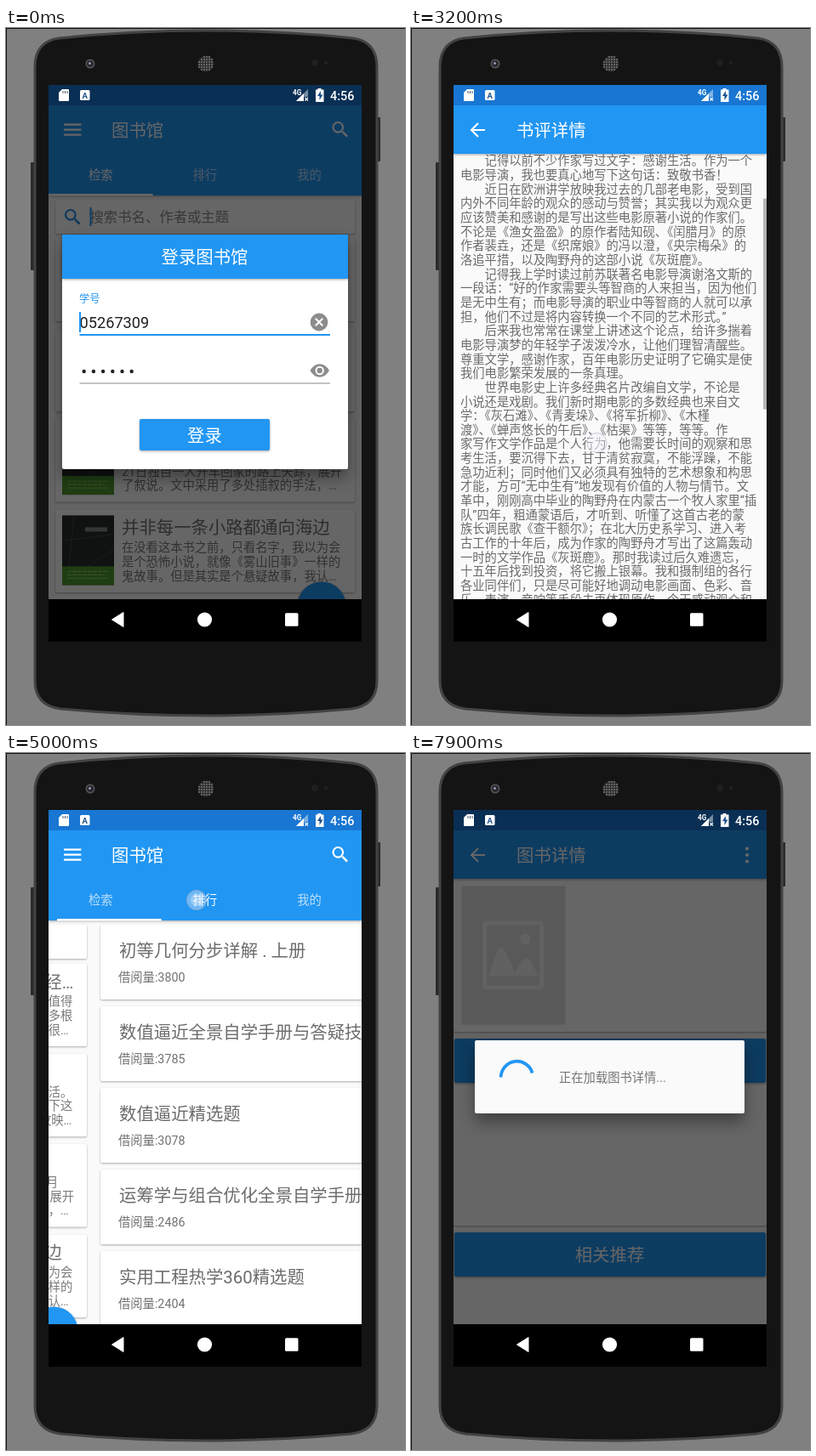
Animation of 469 by 820 pixels, one loop 8000 ms. Source, as an HTML page:

```html
<!DOCTYPE html>
<html lang="zh-CN">
<head>
<meta charset="utf-8">
<title>图书馆</title>
<style>
html, body { margin: 0; width: 100%; height: 100%; overflow: hidden; background: #808080; }
svg { display: block; width: 469px; height: 820px; }
text { font-family: Roboto, "Noto Sans CJK SC", "Noto Sans CJK", sans-serif; white-space: pre; }
.card { fill: #fff; filter: drop-shadow(0 1px 1px rgba(0,0,0,.32)); }
.raised { filter: drop-shadow(0 1px 1.5px rgba(0,0,0,.35)); }
.float { filter: drop-shadow(0 10px 9px rgba(0,0,0,.38)); }
.line { fill: none; stroke-width: 2.1; }
</style>
</head>
<body>
<svg id="stage" viewBox="0 0 469 820"></svg>
<script>
const BLUE = '#2196f3', GREY = '#717171';
const $ = id => document.getElementById(id);

// ---- drawing helpers ----
const rect = (x, y, w, h, fill, more = '') =>
  `<rect x="${x}" y="${y}" width="${w}" height="${h}" fill="${fill}" ${more}/>`;
const circle = (x, y, r, fill, more = '') =>
  `<circle cx="${x}" cy="${y}" r="${r}" fill="${fill}" ${more}/>`;
const path = (d, fill, more = '') => `<path d="${d}" fill="${fill}" ${more}/>`;
const stroke = (d, color, more = '') => `<path class="line" d="${d}" stroke="${color}" ${more}/>`;
// y is the vertical centre of the glyphs
const text = (x, y, str, size, fill, more = '') =>
  `<text x="${x}" y="${(y + size * .37).toFixed(2)}" font-size="${size}" fill="${fill}" ${more}>${str}</text>`;
const mid = (x, y, str, size, fill, more = '') =>
  text(x, y, str, size, fill, 'text-anchor="middle" ' + more);
const card = (x, y, w, h) => rect(x, y, w, h, '#fff', 'class="card" rx="2"');
const group = (id, body, more = '') => `<g id="${id}" ${more}>${body}</g>`;

const menu = stroke('M68 113.6h20.4M68 119.6h20.4M68 125.6h20.4', '#fff');
const back = stroke('M87 120H71M79 112l-8 8 8 8', '#fff');
const lens = (x, y, c) => `<g transform="translate(${x} ${y})">` +
  stroke('M2.9 2.9L8.6 8.6', c, 'style="stroke-width:2.6"') +
  `<circle class="line" cx="-2.2" cy="-2.2" r="5.8" stroke="${c}"/></g>`;
const dots = [112.5, 120, 127.5].map(y => circle(395, y, 2.1, '#fff')).join('');
const star = x => path('M0-7L1.9-2.4 6.8-2 3.1 1.2 4.2 6 0 3.4-4.2 6-3.1 1.2-6.8-2-1.9-2.4Z',
  '#dadada', `transform="translate(${x} 199)"`);

// a whole window: status bar, app bar, body and the black strip below
const page = (id, title, icons, barHeight, body, barMore = '') => group(id,
  rect(50, 67, 368, 605, '#fafafa') +
  `<g clip-path="url(#body)">${body}</g>` +
  rect(50, 91, 368, barHeight, BLUE, 'class="raised"') +
  rect(50, 67, 368, 24, '#1976d2') +
  icons + text(124, 120, title, 20.4, '#fff') + barMore +
  rect(50, 672, 368, 70, '#000'));

// ---- book covers ----
const slateCover = (x, y) => `<g transform="translate(${x} ${y})">` +
  rect(0, 0, 61, 82, '#6b8494') +
  [10, 26, 42, 58, 74].map(r => stroke(`M4 ${r}H58`, '#5c7686', 'stroke-dasharray="2 6"')).join('') +
  rect(18, 6, 22, 55, '#3c3a3a', 'rx="2"') + rect(19, 7, 20, 26, '#b9b0ad') +
  path('M19 33V27l7-7 4 4 5-2 4 5v6z', '#57504f') + rect(19, 34, 20, 26, '#f4f4f2') +
  [...'灰斑鹿'].map((c, i) => mid(34, 39 + i * 7, c, 6.5, '#222')).join('') +
  stroke('M22 37v18M26 42v14', '#999', 'style="stroke-width:1"') + '</g>';
const darkCover = (x, y) => `<g transform="translate(${x} ${y})">` +
  rect(0, 0, 61, 82, '#252d2b') + rect(0, 60, 61, 22, '#4f9a2c') +
  stroke('M0 30L61 22M14 0L8 60M61 40L30 60', '#3f4a46', 'style="stroke-width:1"') +
  rect(27, 14, 26, 5, '#7d8a84') +
  stroke('M6 66H55M6 70H50M6 74H55', '#96cc76', 'style="stroke-width:1" stroke-dasharray="5 1"') + '</g>';
const paleCover = (x, y) => `<g transform="translate(${x} ${y})">` +
  rect(0, 0, 61, 82, '#c9c2b4') + rect(8, 12, 45, 30, '#8c7f6c') + '</g>';

// ---- home: search tab ----
const reviews = [
  [paleCover, '慢灯夜谈：不急才是真正经…', '这本书语言平实却有味道，确实非常值得',
    '静下心来慢慢读完，书里的故事有很多根', '源都在身边的小事里，读着读着就像很…'],
  [slateCover, '致敬书香', '记得以前不少作家写过文字：感谢生活。',
    '作为一个电影导演，我也要真心地写下这', '句话：致敬书香！ 近日在欧洲讲学放映…'],
  [darkCover, '灯塔熄灭的那一夜', '小说以一位寡言的女教师于2009年8月',
    '21日独自一人开车回家的路上失踪，展开', '了叙说。文中采用了多处插叙的手法，…'],
  [darkCover, '并非每一条小路都通向海边', '在没看这本书之前，只看名字，我以为会',
    '是个恐怖小说，就像《雾山旧事》一样的', '鬼故事。但是其实是个悬疑故事，我认…']
];
const searchTab = card(58, 202, 352, 40) + lens(78, 222, '#1e88e5') +
  text(98.5, 222, '搜索书名、作者或主题', 16.36, '#8a8a8a') +
  group('searchCaret', rect(98.5, 211, 2, 22, BLUE)) +
  reviews.map(([cover, title, ...lines], i) => {
    const y = 247.5 + i * 106.3;
    return card(58, y, 352, 97.5) + cover(66, y + 7) + text(136, y + 21.5, title, 20.4, GREY) +
      lines.map((s, n) => text(136, y + 44.5 + n * 16.8, s, 14.3, '#7a7a7a')).join('');
  }).join('') + circle(371, 680, 28.6, BLUE, 'class="raised"');

// ---- home: ranking tab ----
const ranking = [['初等几何分步详解 . 上册', 3800], ['数值逼近全景自学手册与答疑技…', 3785],
  ['数值逼近精选题', 3078], ['运筹学与组合优化全景自学手册', 2486], ['实用工程热学360精选题', 2404]];
const rankTab = ranking.map(([title, n], i) => {
  const y = 202 + i * 96;
  return card(58, y, 352, 88) + text(80, y + 30, title, 20.4, '#6c6c6c') +
    text(79, y + 62, '借阅量:' + n, 14.3, GREY);
}).join('');

const tabs = ['检索', '排行', '我的'].map((s, i) =>
  mid(111.3 + i * 122.67, 173, s, 14.3, '#fff', `id="tab${i}"`)).join('') +
  rect(50, 195, 122.67, 2.6, '#fff', 'id="marker"');
const home = page('home', '图书馆', menu + lens(392.5, 119, '#fff'), 106,
  group('pager', searchTab + `<g transform="translate(368)">${rankTab}</g>`), tabs);

// ---- login dialog ----
const login = group('login',
  rect(66, 243, 336, 276, '#fff', 'class="float" rx="2"') +
  rect(66, 243, 336, 52, BLUE, 'class="raised"') + mid(233.5, 269.5, '登录图书馆', 20.4, '#fff') +
  text(86, 318, '学号', 12.3, BLUE) + text(86.5, 346, '05267309', 18.2, '#212121') +
  group('idCaret', rect(86, 334, 2, 24, BLUE)) + rect(86.5, 360, 294.5, 2, BLUE) +
  circle(368, 346, 10.4, '#8c8c8c') + stroke('M363.8 341.8l8.4 8.4m0-8.4l-8.4 8.4', '#fff') +
  [0, 1, 2, 3, 4, 5].map(i => circle(91.7 + i * 11.2, 404, 2.2, '#212121')).join('') +
  rect(86.5, 417.5, 294.5, 1, '#8a8a8a') +
  path('M357.5 403Q362 395.3 368.7 395.3T380 403Q375.500 410.700 368.700 410.700T357.500 403Z', '#8c8c8c') +
  circle(368.7, 403, 4.2, '#8c8c8c', 'stroke="#fff" stroke-width="2"') +
  rect(157, 460, 153, 37, BLUE, 'class="raised" rx="2"') + mid(233.5, 479, '登录', 20.4, '#fff'));

// ---- review page ----
const article = `　　记得以前不少作家写过文字：感谢生活。作为一个
电影导演，我也要真心地写下这句话：致敬书香！
　　近日在欧洲讲学放映我过去的几部老电影，受到国
内外不同年龄的观众的感动与赞誉；其实我以为观众更
应该赞美和感谢的是写出这些电影原著小说的作家们。
不论是《渔女盈盈》的原作者陆知砚、《闰腊月》的原
作者裴垚，还是《织席娘》的冯以澄，《央宗梅朵》的
洛追平措，以及陶野舟的这部小说《灰斑鹿》。
　　记得我上学时读过前苏联著名电影导演谢洛文斯的
一段话：“好的作家需要头等智商的人来担当，因为他们
是无中生有；而电影导演的职业中等智商的人就可以承
担，他们不过是将内容转换一个不同的艺术形式。”
　　后来我也常常在课堂上讲述这个论点，给许多揣着
电影导演梦的年轻学子泼泼冷水，让他们理智清醒些。
尊重文学，感谢作家，百年电影历史证明了它确实是使
我们电影繁荣发展的一条真理。
　　世界电影史上许多经典名片改编自文学，不论是
小说还是戏剧。我们新时期电影的多数经典也来自文
学：《灰石滩》、《青麦垛》、《将军折柳》、《木槿
渡》、《蝉声悠长的午后》、《枯渠》等等，等等。作
家写作文学作品是个人行为，他需要长时间的观察和思
考生活，要沉得下去，甘于清贫寂寞，不能浮躁，不能
急功近利；同时他们又必须具有独特的艺术想象和构思
才能，方可“无中生有”地发现有价值的人物与情节。文
革中，刚刚高中毕业的陶野舟在内蒙古一个牧人家里“插
队”四年，粗通蒙语后，才听到、听懂了这首古老的蒙
族长调民歌《查干额尔》；在北大历史系学习、进入考
古工作的十年后，成为作家的陶野舟才写出了这篇轰动
一时的文学作品《灰斑鹿》。那时我读过后久难遗忘，
十五年后找到投资，将它搬上银幕。我和摄制组的各行
各业同伴们，只是尽可能好地调动电影画面、色彩、音
乐、表演、音响等手段去再体现原作，今天感动观众和
启发人们思辨的主要还是原小说的人物、情节及思想！
　　当然，原创电影剧本也产生了一些经典电影，祁墨
岑、鲍湛、纪蘅川等第六代电影导演以自己写作的原创
电影取得了一些成功。近年来导演自编自导的现象也似
乎越来越烈。但是，以我教授导演五十年的阅历来看，
多数导演并不具备独立编剧的能力，即使偶尔成功也难
以持久。影视导演是在商业运作、技术控制、制片事物
的复杂过程中进行创作的，大量的时间与精力都会被牵
扯到或浪费到许多无艺术、思想价值的活动中去，再有
才能的人想又编又导也会江郎才尽，无以为继。
　　37年前的一次创作会议上，老前辈郭砚林导演针对
我们这批刚拿出《沉默者的伞》、《苇雁》、《岁月的
回廊》、《阿穗》的第四代导演们说：“要重视电影的文
学价值，要向作家们学习，从好的小说里寻找养分。”`;
const review = page('review', '书评详情', back, 57,
  group('reviewBody',
    card(50, 150, 368, 97) + slateCover(59, 156.5) +
    text(133, 171.5, '致敬书香', 16.36, '#333') + text(133, 199, '评分 :', 14.3, '#7a7a7a') +
    [179.7, 196, 212.3, 228.4, 244.6].map(star).join('') +
    group('article', article.split('\n').map((s, i) =>
      text(58, 267 + i * 16.66, s, 14.3, '#6b6b6b')).join(''))) +
  rect(414, 148, 4, 248, '#000', 'id="reviewThumb" fill-opacity=".28"'));

// ---- book page with its loading dialog ----
const band = (y, s) => rect(51, y, 366, 52, BLUE, 'class="raised" rx="2"') + mid(233.5, y + 26.5, s, 20.4, '#fff');
const picture = rect(59.5, 156.5, 122, 163, '#dfdfdf') +
  '<rect x="86.5" y="200" width="67" height="76" rx="2" fill="none" stroke="#f3f3f3" stroke-width="5"/>' +
  circle(134, 219, 6.5, '#f3f3f3') +
  path('M92 262Q101 230 105 228T122 258Q133 238 138 242T149 262Z', '#f3f3f3');
const book = page('book', '图书详情', back + dots, 57,
  card(50, 146, 368, 182) + picture + card(50, 338, 368, 218) + band(336, '流通情况') +
  card(50, 566, 368, 120) + band(564, '相关推荐') +
  rect(414, 148, 4, 427, '#000', 'id="bookThumb"'));
const loading = group('loading',
  rect(75, 338, 317, 86, '#fafafa', 'class="float" rx="2"') +
  '<path id="spinner" fill="none" stroke="#2196f3" stroke-width="3.8"/>' +
  text(174, 381.5, '正在加载图书详情...', 14.3, '#757575'));

// ---- phone and system icons ----
const shell = 'M34 46Q34 16 62 12Q235-6 408 12Q436 16 436 46V768Q436 797 406 801Q235 817 64 801Q34 797 34 768Z';
let holes = '';
for (let y = -8; y <= 8; y += 3)
  for (let x = -8; x <= 8; x += 3)
    if (x * x + y * y < 85) holes += circle(235 + x, 42 + y, 1, '#777');
const phone = rect(0, 0, 469, 820, '#808080') + rect(0, 0, 469, 1, '#111') + rect(0, 0, 1, 820, '#111') +
  rect(29, 158, 5, 127, '#2b2b2b', 'rx="1"') + rect(436, 105, 4, 52, '#2b2b2b', 'rx="1"') +
  path(shell, '#141414', 'stroke="#434343" stroke-width="3"') +
  circle(99, 42, 5.5, '#555') + circle(99, 42, 3.8, '#25252f') + circle(98.5, 41.5, 1.5, '#9a9ab0') +
  circle(235, 42, 9.5, '#2c2c2c') + holes + circle(363, 41, 4, '#1f1f1f') + circle(376, 41, 2.5, '#1f1f1f');
const system =
  path('M66 72h7q1 0 1 1v12q0 1-1 1H63q-1 0-1-1V76z', '#fff') + stroke('M67 74v3M69.500 74v3M72 74v3', '#456', 'style="stroke-width:1"') +
  rect(87, 73, 11.5, 12, '#fff', 'rx="1.5"') + mid(92.7, 79, 'A', 9.5, '#1c4f88', 'font-weight="700"') +
  text(337, 75.5, '4G', 8.2, '#fff', 'font-weight="700"') +
  path('M355 72V81H350V86H341Z', '#fff', 'opacity=".45"') + path('M350 77V86H341Z', '#fff') +
  stroke('M351.500 82l3.500 3.500m0-3.500l-3.500 3.500', '#fff', 'style="stroke-width:1.2"') +
  path('M366.5 71h4v1.500h3V87h-9.500V72.500h2.500z', '#fff') + path('M370 74l-4 6h2.500v5l4-6.500h-2.500z', '#1c4f88') +
  text(381, 79.3, '4:56', 14.4, '#fff', 'font-weight="500"') +
  path('M124.500 696L138 687.500V704.500Z', '#fff', 'stroke="#fff" stroke-linejoin="round"') +
  circle(233.5, 696, 8.6, '#fff') + rect(328, 688.3, 15.5, 15.5, '#fff', 'rx="1.5"');
const touch = group('touch', circle(0, 0, 11.5, '#f0f0ff', 'fill-opacity=".38" stroke="#aab" stroke-opacity=".6"') +
  circle(0, 0, 7, '#fff', 'fill-opacity=".3"'));

const shade = id => rect(50, 67, 368, 655, '#000', `id="${id}"`);
$('stage').innerHTML =
  '<defs><clipPath id="screen"><rect x="50" y="67" width="368" height="655"/></clipPath>' +
  '<clipPath id="body"><rect x="50" y="148" width="368" height="524"/></clipPath></defs>' +
  phone + `<g clip-path="url(#screen)">${home + shade('loginShade') + login + review + book + shade('bookShade') + loading}</g>` +
  system + touch;

// ---- motion ----
// piecewise linear track: time, value, time, value, ...
function track(t, ...k) {
  if (t <= k[0]) return k[1];
  for (let i = 2; i < k.length; i += 2)
    if (t <= k[i]) return k[i - 1] + (k[i + 1] - k[i - 1]) * (t - k[i - 2]) / (k[i] - k[i - 2]);
  return k[k.length - 1];
}
const within = (t, a, b) => t >= a && t < b;
const alpha = (id, v) => {
  $(id).style.opacity = v;
  $(id).style.display = v > 0 ? '' : 'none';
};
const move = (id, x, y) => $(id).setAttribute('transform', `translate(${x} ${y})`);
const enter = dt => Math.round(52 * Math.max(0, 1 - (dt + 115) / 350) ** 5);
const ease = x => x <= 0 ? 0 : x >= 1 ? 1 : x < .5 ? 4 * x ** 3 : 1 - 4 * (1 - x) ** 3;

function spin(t) {
  const p = .196 + (t - 6600) / 1214, turn = Math.floor(p), q = p - turn;
  const tail = -65 + 335 * (t - 6600) / 1300 + 270 * (turn + ease(2 * q - 1));
  const sweep = 4 + 270 * (ease(2 * q) - ease(2 * q - 1));
  const at = deg => {
    const a = deg * Math.PI / 180;
    return `${124.5 + 18.8 * Math.cos(a)} ${381.5 + 18.8 * Math.sin(a)}`;
  };
  $('spinner').setAttribute('d', `M${at(tail)}A18.8 18.8 0 ${sweep > 180 ? 1 : 0} 1 ${at(tail + sweep)}`);
}

const taps = [[700, 800, 233, 480], [1500, 1700, 112.5, 417.5], [4100, 4300, 131, 696],
  [4900, 5200, 224, 173], [6300, 6500, 228, 345]];
function point(t) {
  const tap = taps.find(([a, b]) => within(t, a, b));
  if (tap) {
    alpha('touch', 1);
    move('touch', tap[2], tap[3]);
  } else if (within(t, 3100, 3700)) {
    alpha('touch', t < 3600 ? 1 : .4);
    move('touch', track(t, 3100, 216, 3200, 218.5, 3600, 225),
      track(t, 3100, 575, 3200, 488, 3300, 405, 3400, 340, 3500, 303, 3600, 295));
  } else alpha('touch', 0);
}

function render(t) {
  alpha('searchCaret', t < 500 ? 1 : 0);
  alpha('idCaret', t < 300 ? 1 : 0);
  alpha('login', track(t, 700, 1, 800, .45, 900, 0));
  alpha('loginShade', track(t, 700, .6, 800, .38, 900, .14, 1000, 0));

  move('pager', -track(t, 4900, 0, 5000, 315, 5100, 356, 5200, 367, 5300, 368), 0);
  move('marker', track(t, 4900, 0, 5000, 10, 5100, 76, 5200, 115, 5300, 122.67), 0);
  const picked = t < 5000 ? 0 : 1;
  for (let i = 0; i < 3; i++) alpha('tab' + i, i === picked ? 1 : .7);

  alpha('review', within(t, 1700, 4500) ? track(t, 1700, .95, 1800, 1, 4300, 1, 4400, .5) : 0);
  move('review', 0, enter(t - 1700) + track(t, 4200, 0, 4300, 2, 4400, 14));
  const scroll = track(t, 3000, 0, 3100, 30, 3200, 111, 3300, 200, 3400, 268, 3500, 308, 3600, 330, 3700, 338);
  move('reviewBody', 0, -scroll);
  alpha('article', t < 2500 ? 0 : 1);
  alpha('reviewThumb', t < 2500 ? 0 : 1);
  move('reviewThumb', 0, scroll * .474);

  const open = t >= 6600, drop = enter(t - 6600);
  alpha('book', open ? 1 : 0);
  move('book', 0, drop);
  alpha('bookThumb', track(t, 6900, .25, 7300, 0));
  alpha('bookShade', open ? track(t, 6600, .236, 6700, .42, 6800, .52, 6900, .58, 7000, .6) : 0);
  alpha('loading', open ? track(t, 6600, .94, 6700, 1) : 0);
  move('loading', 0, drop);
  spin(t);
  point(t);
}

const start = performance.now();
let last = -1;
function tick() {
  const t = Math.floor((performance.now() - start) % 8000 / 100) * 100;
  if (t !== last) render(last = t);
  requestAnimationFrame(tick);
}
tick();
</script>
</body>
</html>
```
